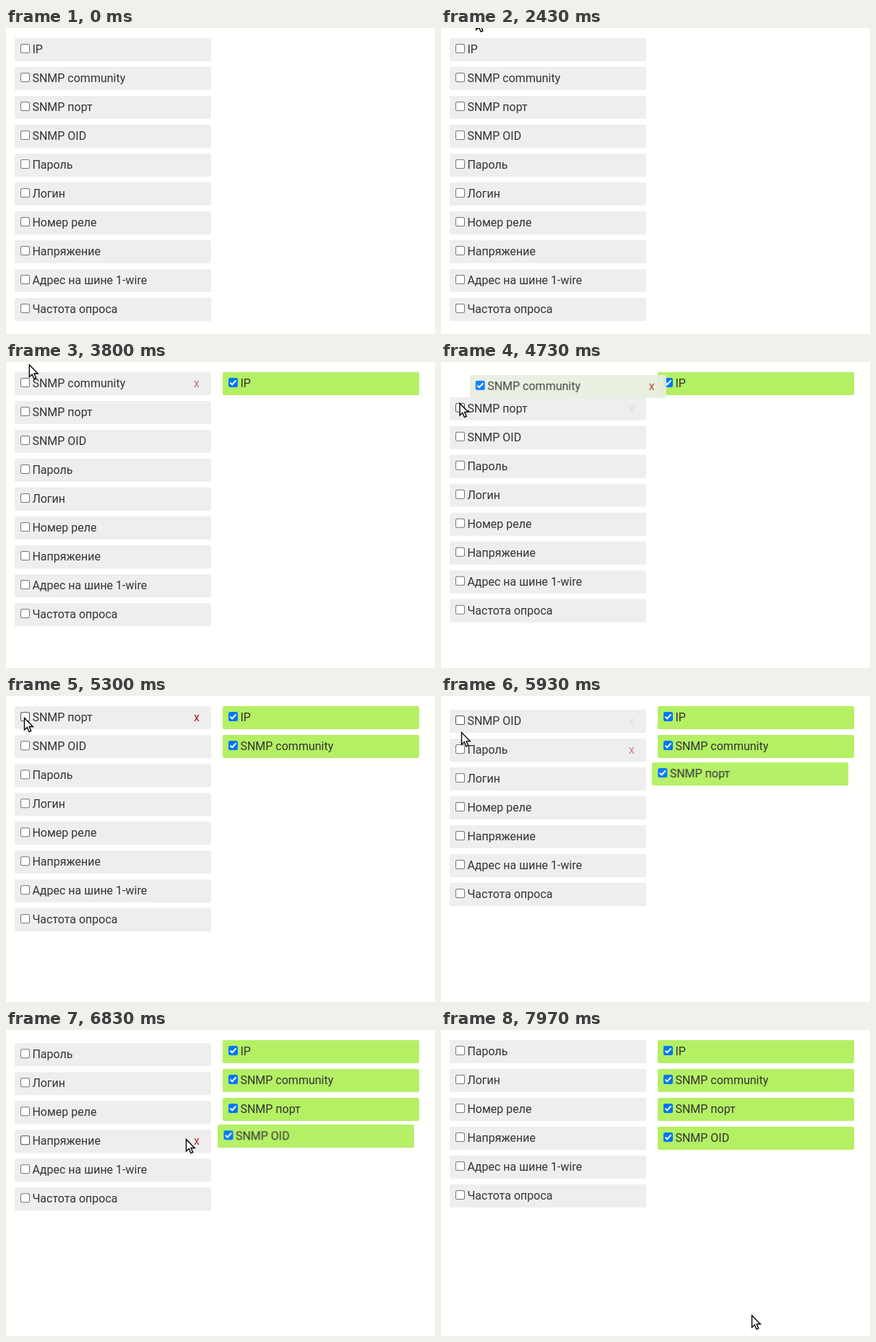
An HTML page with a canvas for the animation above (8000 ms loop, 594 by 424 pixels).

```html
<!DOCTYPE html>
<html lang="ru">
<head>
<meta charset="utf-8">
<style>
  html, body { margin: 0; width: 100%; height: 100%; overflow: hidden; background: #fffffd; }
  canvas { display: block; }
</style>
</head>
<body>
<canvas id="stage" width="594" height="424"></canvas>
<script>
const LOOP = 8000;
const W = 272, H = 32, STEP = 40, TOP = 14, LEFT = 12, RIGHT = 300;
const PAGE = '#fffffd', TODO = '#eeeeee', DONE = 'rgb(180, 240, 100)';
const NAMES = ['IP', 'SNMP community', 'SNMP порт', 'SNMP OID', 'Пароль', 'Логин',
  'Номер реле', 'Напряжение', 'Адрес на шине 1-wire', 'Частота опроса'];

// Moments at which the top item of the left list is sent to the right one
const SENT = [3115, 4697, 5550, 6434];
const FLIP = Math.sqrt(STEP) * 120;
const SEND_DELAY = 17;

// Stops of the pointer: time, x, y
const BOX = [25, 30];
const STOPS = [
  [2350, 51, -20], [2750, ...BOX], [3600, ...BOX], [3820, 32, 3], [4200, ...BOX],
  [6404, ...BOX], [6690, 249, 151], [6830, 249, 151], [7580, 430, 395]
];

const stage = document.getElementById('stage');
const ctx = stage.getContext('2d');
const layer = document.createElement('canvas');
layer.width = W;
layer.height = H;
const layerCtx = layer.getContext('2d');

const clamp = v => Math.min(1, Math.max(0, v));
const cubicOut = v => 1 - (1 - clamp(v)) ** 3;
const smooth = v => v * v * (3 - 2 * v);

// The pointer eases from stop to stop and dips after each click but the last
function pointer(t) {
  const i = STOPS.findIndex(s => s[0] > t);
  if (i === 0) return [0, -60];
  if (i < 0) return STOPS[STOPS.length - 1].slice(1);
  const [t0, x0, y0] = STOPS[i - 1], [t1, x1, y1] = STOPS[i];
  const k = smooth((t - t0) / (t1 - t0));
  let x = x0 + (x1 - x0) * k, y = y0 + (y1 - y0) * k;
  for (const s of SENT.slice(0, -1)) {
    const u = clamp((t - s + 30) / 530);
    x += 11 * Math.sin(Math.PI * u) ** 3;
    y += 41 * Math.sin(Math.PI * u ** 0.7);
  }
  return [x, y];
}

// Place of an item, with its crossfade progress
function place(i, t) {
  const home = TOP + STEP * i;
  if (i < SENT.length && t >= SENT[i]) {
    const dx = RIGHT - LEFT, dy = home - TOP;
    const time = Math.sqrt(Math.hypot(dx, dy)) * 30;
    const k = cubicOut((t - SENT[i] - SEND_DELAY) / time);
    return { x: LEFT + dx * k, y: TOP + dy * k, k, sent: true };
  }
  const shift = SENT.reduce((sum, s, n) => n < i ? sum + cubicOut((t - s) / FLIP) : sum, 0);
  return { x: LEFT, y: home - STEP * shift, k: 0, sent: false };
}

function hovered(i, t) {
  const p = place(i, t), [x, y] = pointer(t);
  return x >= p.x && x < p.x + W && y >= p.y && y < p.y + H;
}

// Hover state averaged over the 200 ms fade of the remove button
function buttonAlpha(i, t) {
  let sum = 0;
  for (let n = 0; n < 10; n++) sum += hovered(i, t - n * 20);
  return sum / 10;
}

function fillRound(c, x, y, w, h, r, color) {
  c.fillStyle = color;
  c.beginPath();
  c.roundRect(x, y, w, h, r);
  c.fill();
}

function drawCheckbox(c, x, y, checked, hover) {
  if (!checked) {
    fillRound(c, x, y, 13, 13, 2.5, hover ? '#4f4f4f' : '#767676');
    fillRound(c, x + 1, y + 1, 11, 11, 1.5, '#fff');
    return;
  }
  fillRound(c, x, y, 13, 13, 2.5, hover ? '#005cc8' : '#0075ff');
  c.strokeStyle = '#fff';
  c.lineWidth = 2;
  c.beginPath();
  c.moveTo(x + 2.4, y + 6.6);
  c.lineTo(x + 5.2, y + 9.3);
  c.lineTo(x + 10.6, y + 3.4);
  c.stroke();
}

function drawItem(c, x, y, name, { color, checked, hover, button }) {
  c.save();
  c.translate(x, y);
  fillRound(c, 0, 0, W, H, 2, color);
  drawCheckbox(c, 8, 8, checked, hover);
  c.font = '16px Roboto, sans-serif';
  c.fillStyle = '#333';
  c.fillText(name, 24.4, 21);
  if (button > 0) {
    c.globalAlpha = button;
    c.fillStyle = 'rgb(170, 30, 30)';
    c.textAlign = 'center';
    c.fillText('x', 252, 21);
  }
  c.restore();
}

function drawFaded(p, alpha, name, look) {
  layerCtx.clearRect(0, 0, W, H);
  drawItem(layerCtx, 0, 0, name, look);
  ctx.globalAlpha = alpha;
  ctx.drawImage(layer, p.x, p.y);
  ctx.globalAlpha = 1;
}

function drawPointer([x, y]) {
  ctx.save();
  ctx.translate(x + 0.5, y + 0.5);
  ctx.beginPath();
  [[0, 0], [0, 16.5], [3.8, 13], [6.4, 19.2], [9.2, 18], [6.6, 12], [11.8, 12]]
    .forEach(([px, py]) => ctx.lineTo(px, py));
  ctx.closePath();
  ctx.fillStyle = '#fff';
  ctx.fill();
  ctx.strokeStyle = '#000';
  ctx.lineWidth = 1.4;
  ctx.stroke();
  ctx.restore();
}

function draw(t) {
  ctx.fillStyle = PAGE;
  ctx.fillRect(0, 0, stage.width, stage.height);
  const moving = [];
  NAMES.forEach((name, i) => {
    const p = place(i, t);
    if (p.sent && p.k < 1) {
      moving.push([name, p]);
      return;
    }
    drawItem(ctx, p.x, p.y, name, {
      color: p.sent ? DONE : TODO,
      checked: p.sent,
      hover: hovered(i, t),
      button: buttonAlpha(i, t)
    });
  });
  for (const [name, p] of moving) {
    drawFaded(p, 1 - p.k, name, { color: TODO, checked: true, button: 1 });
    drawFaded(p, p.k, name, { color: DONE, checked: true, button: 0 });
  }
  drawPointer(pointer(t));
}

const start = performance.now();
function tick() {
  draw((performance.now() - start) % LOOP);
  requestAnimationFrame(tick);
}
tick();
</script>
</body>
</html>
```
